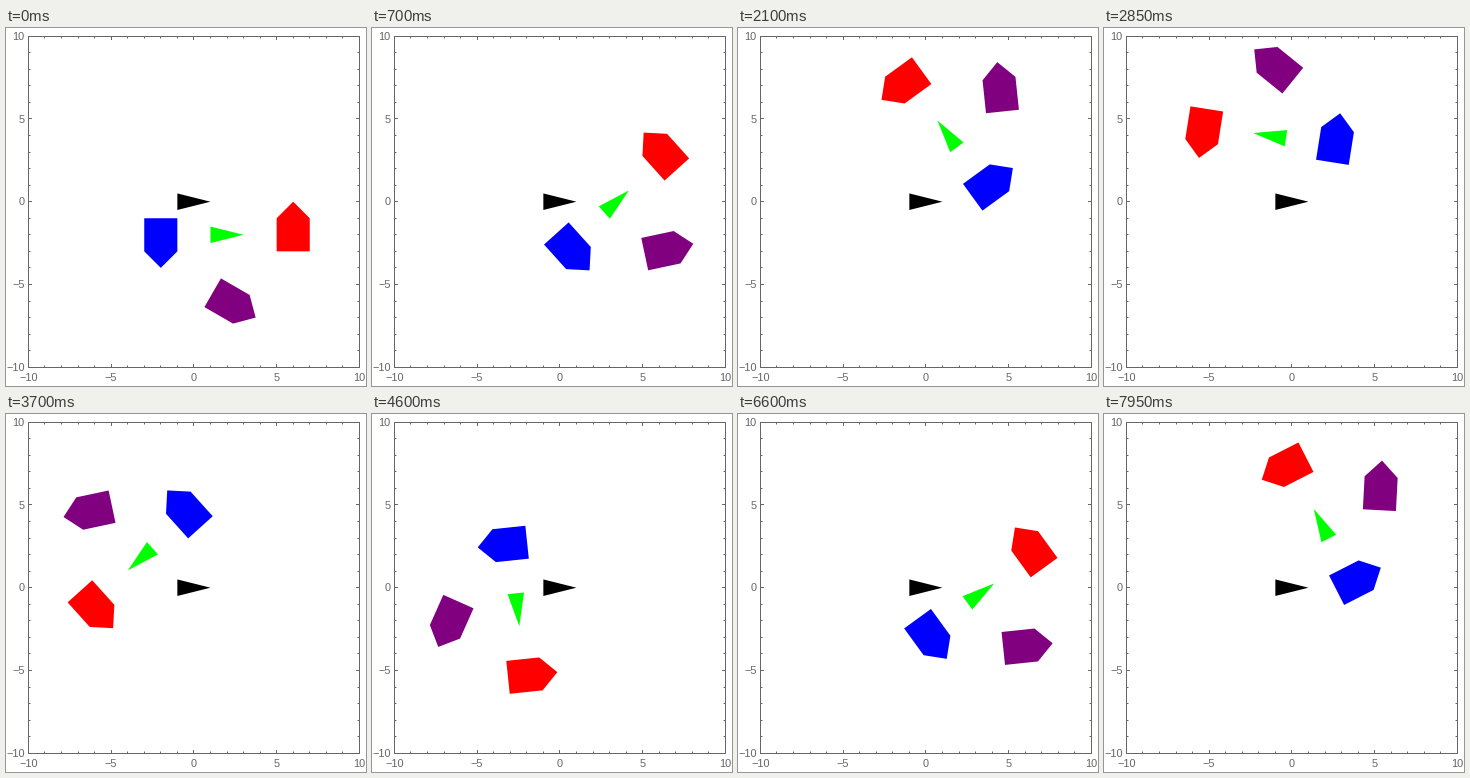
A matplotlib script that plays this animation: 360x358 px, repeating every 8000 ms.

```python
import math

import matplotlib.pyplot as plt
import numpy as np
from matplotlib.animation import FuncAnimation
from matplotlib.patches import Polygon

W, H, DPI = 360, 358, 100
LEFT, TOP, UNIT = 22.4, 8.2, 16.55
GRAY = "0.4"
FRAMES, INTERVAL = 160, 50

# Constant body velocity (units/s) and turn rate (rad/s)
VX, VY, OMEGA = 3.0, 2.0, math.pi / 3
START = np.array([2.0, -2.0])

ARROW = np.array([(-1, 0.5), (-1, -0.5), (1, 0)])
HOUSE = np.array([(-1, 1), (-1, -1), (1, -1), (2, 0), (1, 1)])


def rotate(points, angle):
    c, s = math.cos(angle), math.sin(angle)
    return np.asarray(points) @ np.array([(c, s), (-s, c)])


def to_px(points):
    return np.array([LEFT, TOP]) + (np.asarray(points) * (1, -1) + 10) * UNIT


def house(x, y, degrees):
    return rotate(HOUSE, math.radians(degrees)) + (x, y)


# Shapes in the moving frame of the green arrow
SHAPES = [
    (ARROW, (0, 1, 0)),
    (house(-4, 0, -90), (0, 0, 1)),
    (house(4, 0, 90), (1, 0, 0)),
    (house(0, -4, -30), (0.5, 0, 0.5)),
]
ARM = np.array([VY, -VX]) / OMEGA
PIVOT = START - ARM

fig = plt.figure(figsize=(W / DPI, H / DPI), dpi=DPI, facecolor="white")
ax = fig.add_axes([0, 0, 1, 1])
ax.set_xlim(0, W)
ax.set_ylim(H, 0)
ax.axis("off")


def line(x0, y0, x1, y1):
    ax.plot([x0, x1], [y0, y1], color=GRAY, lw=72 / DPI, snap=False,
            solid_capstyle="butt")


def label(x, y, value, align):
    ax.text(x, y, str(value).replace("-", "\u2212"), color=GRAY, ha=align,
            va="baseline", family="Liberation Sans", fontsize=11 * 72 / DPI)


def draw_frame():
    def crisp(v):
        return math.floor(v) + 0.5

    x0, y0 = crisp(LEFT), crisp(TOP)
    x1, y1 = crisp(LEFT + 20 * UNIT), crisp(TOP + 20 * UNIT)
    for y in (y0, y1):
        line(x0 - 0.5, y, x1 + 0.5, y)
    for x in (x0, x1):
        line(x, y0 - 0.5, x, y1 + 0.5)
    for v in range(-10, 11):
        px, py = to_px((v, v))
        x, y = crisp(px), crisp(py)
        size = 3.5 if v % 5 == 0 else 2
        line(x, y0, x, y0 + size)
        line(x, y1, x, y1 - size)
        line(x0, y, x0 + size, y)
        line(x1, y, x1 - size, y)
        if v % 5 == 0:
            label(px, 353, v, "center")
            label(18.7, py + 3.6, v, "right")


def add_shape(points, color):
    return ax.add_patch(Polygon(to_px(points), closed=True, facecolor=color,
                                edgecolor="none", linewidth=0))


draw_frame()
add_shape(ARROW, "black")
patches = [add_shape(pts + START, color) for pts, color in SHAPES]


def update(i):
    angle = OMEGA * i * INTERVAL / 1000
    for patch, (pts, _) in zip(patches, SHAPES):
        patch.set_xy(to_px(PIVOT + rotate(pts + ARM, angle)))
    return patches


anim = FuncAnimation(fig, update, frames=FRAMES, interval=INTERVAL,
                     repeat=True, repeat_delay=0, blit=False)
plt.show()
```
